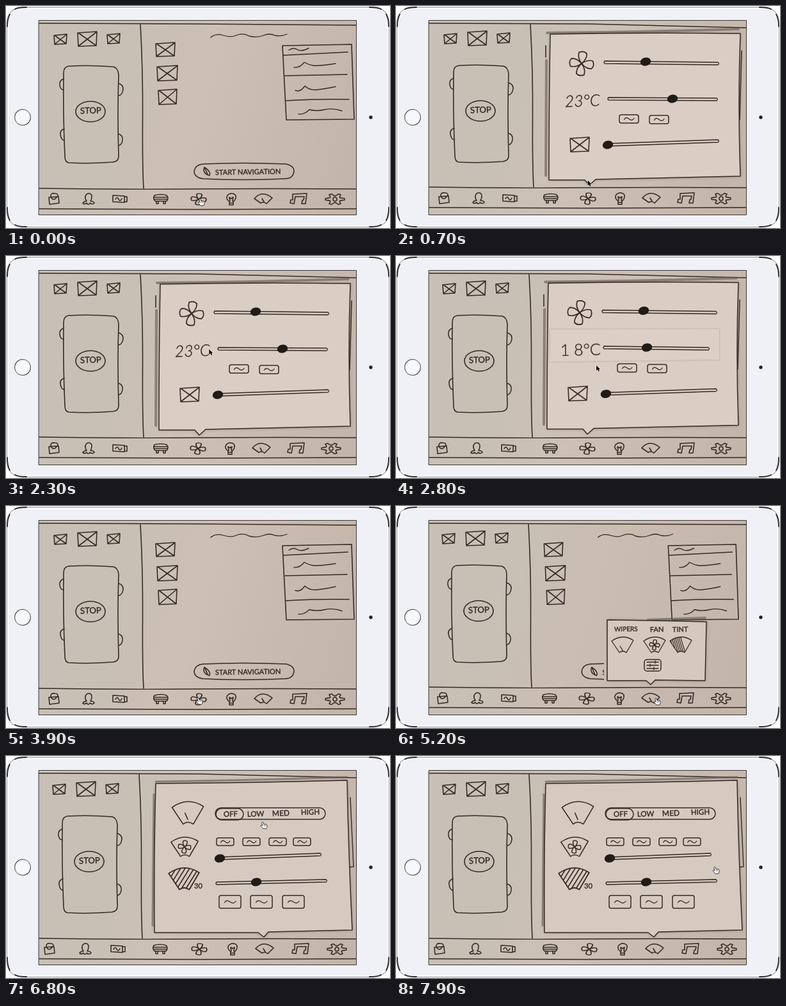
These frames come from a looping animation (600x347 px, 8000 ms). An HTML page with a canvas:

```html
<!DOCTYPE html>
<html lang="en">
<head>
<meta charset="utf-8">
<title>Paper prototype on a tablet</title>
<style>
html, body { margin: 0; width: 100%; height: 100%; overflow: hidden; background: #fff; }
canvas { display: block; width: 600px; height: 347px; }
</style>
</head>
<body>
<canvas id="stage" width="600" height="347"></canvas>
<script>
const ctx = document.getElementById('stage').getContext('2d');
const INK = '#352b25';
const LOOP = 8000;
const STEP = 100;

function ink(d, width = 1.6, fill) {
  const path = new Path2D(d);
  if (fill) { ctx.fillStyle = fill; ctx.fill(path); }
  ctx.lineWidth = width;
  ctx.strokeStyle = INK;
  ctx.stroke(path);
}

function at(x, y, draw, scale = 1) {
  ctx.save();
  ctx.translate(x, y);
  ctx.scale(scale, scale);
  draw();
  ctx.restore();
}

function write(text, x, y, size, tilt = 0, style = '400') {
  at(x, y, () => {
    ctx.rotate(tilt);
    ctx.fillStyle = ctx.strokeStyle = INK;
    ctx.lineWidth = 0.4;
    ctx.font = `${style} ${size}px Lato, sans-serif`;
    ctx.fillText(text, 0, 0);
    ctx.strokeText(text, 0, 0);
  });
}

function crossBox(x, y, w, h) {
  at(x, y, () => {
    ink(`M0 2L${w} 0L${w - 1} ${h - 1}L1 ${h}ZM1 2L${w - 1} ${h - 1}M${w - 1} 1L2 ${h - 1}`, 1.6);
  });
}

function softBox(x, y, w, h, r) {
  ctx.beginPath();
  ctx.roundRect(x, y, w, h, r);
  ctx.lineWidth = 1.5;
  ctx.strokeStyle = INK;
  ctx.stroke();
}

function waveButton(x, y, w, h) {
  softBox(x, y, w, h, 3);
  const q = w / 6;
  at(x + w / 2, y + h / 2, () => ink(`M${-q * 1.5} 1Q${-q} -4 0 0T${q * 1.6} -1`, 1.3));
}

function slider(x1, y1, x2, y2, knobX, knobY) {
  ink(`M${x1} ${y1 - 2}L${x2} ${y2 - 2}Q${x2 + 3} ${y2} ${x2} ${y2 + 2}L${x1} ${y1 + 2}Q${x1 - 2} ${y1} ${x1} ${y1 - 2}`, 1.3);
  ctx.fillStyle = '#211b18';
  ctx.beginPath();
  ctx.ellipse(knobX, knobY, 8.3, 6.5, -0.2, 0, 7);
  ctx.fill();
}

function fan(r, width) {
  const p = k => (k * r).toFixed(1);
  for (let i = 0; i < 4; i++) {
    ctx.save();
    ctx.rotate(i * Math.PI / 2 + 0.1);
    ink(`M0 0Q${p(-.4)} ${p(-.45)} ${p(-.3)} ${p(-.9)}Q${p(.1)} ${p(-1.1)} ${p(.35)} ${p(-.85)}Q${p(.4)} ${p(-.4)} 0 0`, width);
    ctx.restore();
  }
}

// Windscreen outline, about 34 px wide
const GLASS = 'M-17 -6Q0 -18 17 -7L6 12Q0 8 -5 12Z';

function hatchedGlass(dense) {
  ctx.save();
  ctx.clip(new Path2D(GLASS));
  const gap = dense ? 2.8 : 5;
  for (let x = -24; x < (dense ? -1 : 5); x += gap) {
    ink(dense ? `M${x} -16L${x + 9} 14` : `M${x} 13L${x + 18} -16`, 1.2);
  }
  ctx.restore();
  ink(GLASS, 1.3);
}

const icons = [
  () => ink('M-8 -3L7 -4L8 6L-7 8ZM-5 -3Q-6 -10 1 -9Q7 -9 6 -4M-4 -2Q0 3 4 -3'),
  () => ink('M-3 3Q-6 -1 -5 -5Q-3 -9 0 -9Q5 -9 5 -4Q5 0 3 3Q8 3 9 6Q6 9 2 6Q0 10 -3 6Q-7 9 -9 6Q-7 3 -3 3'),
  () => ink('M-11 -6L7 -5L7 5L-11 4ZM7 -4L11 -4L11 4L7 4M-7 0Q-4 -5 -2 0T3 -1'),
  () => ink('M-10 -6Q0 -9 9 -6Q13 -2 9 3L-9 3Q-13 -1 -10 -6ZM-11 -3L10 -3M-11 0L10 0M-7 3L-7 7L-4 7L-4 3M4 3L4 7L7 7L7 3'),
  () => { ctx.scale(1.2, 0.9); fan(10, 1.5); },
  () => ink('M-3 4Q-8 0 -7 -4Q-5 -9 1 -9Q8 -8 7 -3Q7 1 3 4L3 9L-3 9ZM-3 6L3 6M-2 3L-3 -3L0 -1L3 -3L2 3'),
  () => ink('M-14 -1Q-2 -15 14 -2L5 7Q1 3 -4 6ZM1 4L-2 -1'),
  () => ink('M-9 -8L13 -9L11 7L5 7L6 2L8 1L9 -4L-5 -4L-7 7L-13 6L-12 1L-9 1Z'),
  () => {
    let d = '';
    for (let i = 0; i < 24; i++) {
      const a = (i - 0.5) * Math.PI / 12, r = i % 4 < 2 ? 1 : 0.6;
      d += `${i ? 'L' : 'M'}${(15 * r * Math.cos(a)).toFixed(1)} ${(9 * r * Math.sin(a)).toFixed(1)}`;
    }
    ink(d + 'ZM-3 0A3 3 0 1 0 3 0A3 3 0 1 0 -3 0');
  }
];

function paper(middle) {
  const g = ctx.createLinearGradient(51, 60, 548, 200);
  g.addColorStop(0, '#c8c0b6');
  g.addColorStop(0.3, '#c8bfb5');
  g.addColorStop(0.5, middle);
  g.addColorStop(1, '#c4b5aa');
  ctx.fillStyle = g;
  ctx.fillRect(51, 22, 497, 305);
}

function sheet(d, fill) {
  ctx.save();
  ctx.shadowColor = '#54483e80';
  ctx.shadowBlur = 5;
  ctx.fillStyle = fill;
  ctx.fill(new Path2D(d));
  ctx.restore();
  ink(d, 1.5);
}

function smear(d, width = 4) {
  ctx.strokeStyle = '#61574f99';
  ctx.lineWidth = width;
  ctx.stroke(new Path2D(d));
}

function carSide(dx, dy) {
  at(dx, dy, () => {
    crossBox(75, 44, 20, 16);
    crossBox(112, 40, 30, 23);
    crossBox(158, 43, 20, 16);
    ink('M98 94Q132 92 168 95Q175 97 176 107Q174 165 176 235Q176 243 167 244Q130 247 98 245Q92 244 92 235Q89 170 90 105Q90 95 98 94Z', 1.6);
    ink('M90 114Q83 116 84 124Q85 131 90 131M91 192Q84 194 85 201Q86 209 91 210M176 121Q183 123 183 130Q182 139 176 140M176 200Q183 202 182 210Q181 217 176 218');
    ctx.beginPath();
    ctx.ellipse(132, 165, 23, 16, 0, 0, 7);
    ctx.lineWidth = 1.6;
    ctx.stroke();
    write('STOP', 116, 168.5, 13.2, -0.03);
  });
}

function frameLines(dx, topRight, floor) {
  ink(`M52 27L300 28L547 ${topRight}M52 ${floor}Q180 ${floor + 2} 300 ${floor + 1}T547 ${floor + 1}M52 ${floor + 32}L300 ${floor + 33}L547 ${floor + 32}`, 1.4);
  ink(`M${210 + dx} 29Q${214 + dx} 100 ${213.5 + dx} 175T${215 + dx} ${floor}`, 1.6);
}

function base({ dx, dy, top, floor, iconY, iconXs, middle }) {
  paper(middle);
  frameLines(dx, top, floor);
  carSide(dx, dy);
  iconXs.forEach((x, i) => at(x, iconY, icons[i]));
}

function mapSide(dx = 0, stretch = 1) {
  ctx.save();
  ctx.translate(dx, 0);
  ctx.scale(stretch, 1);
  crossBox(234, 57, 30, 22);
  crossBox(236, 93, 32, 24);
  crossBox(238, 130, 29, 24);
  ink('M320 49Q328 42 340 46Q352 50 362 45Q372 42 380 47Q392 50 402 46Q412 42 420 46Q430 48 439 44', 1.3);
  ink('M432 62L540 60L544 177L438 178ZM434 77Q490 74 534 72M436 109L533 107M437 148Q490 145 536 146', 1.6);
  ink('M442 69Q449 64 455 68T473 66M450 96Q459 97 466 88Q473 92 480 93T515 90M452 132Q460 135 467 125Q473 131 482 131T515 126M457 169Q466 170 474 162Q485 165 498 162T525 164', 1.4);
  ink('M308 247Q370 244 438 247Q450 250 450 258Q449 270 435 270Q370 273 308 270Q294 268 294 258Q296 248 308 247Z', 1.6);
  ink('M310 252Q306 261 318 265Q321 259 310 252M310 252L315 263', 1.6);
  write('START NAVIGATION', 327, 264, 11, -0.015);
  ctx.restore();
}

const mainLook = {
  dx: 0, dy: 0, top: 30, floor: 285, iconY: 302, middle: '#cdbfb5',
  iconXs: [75, 129, 178, 242, 301, 352, 402, 457, 514]
};
const climateLook = {
  dx: 0, dy: -1, top: 34, floor: 283, iconY: 301, middle: '#cdc1b7',
  iconXs: [75, 129, 178, 242, 300, 350, 399, 453, 508]
};
const coolLook = { ...climateLook, dx: -2, iconXs: [72, 126, 176, 241, 299, 349, 398, 453, 508] };
const wiperLook = {
  ...climateLook, dx: -3, top: 29, middle: '#cabdb2',
  iconXs: [73, 127, 176, 240, 298, 349, 398, 452, 508]
};
const detailLook = {
  ...climateLook, dx: -2, dy: 0, floor: 285, iconY: 302,
  iconXs: [68, 124, 175, 241, 302, 354, 404, 460, 517]
};

function mainScreen() {
  base(mainLook);
  mapSide();
}

function climatePanel(cool) {
  base(cool ? coolLook : climateLook);
  const shift = cool ? -3 : 0;
  at(shift, shift / 2, () => {
    smear('M236 42Q380 41 535 36M235 85L234 265');
    ink('M234 62L234 80M540 70L537 178', 1.6);
    sheet('M241 44Q390 41 538 43Q534 150 538 266Q425 269 312 271L302 280L295 272L239 272Q239 150 241 44Z', '#dacdc4');
    at(290, 90, () => fan(19, 1.7));
    slider(326, 88, 503, 90, 390, 87);
    if (!cool) {
      write('23°C', 264, 158, 25, -0.04, 'italic 300');
      slider(332, 145, 501, 146, 432, 145);
    }
    waveButton(349, 170, 30, 13);
    waveButton(396, 171, 30, 13);
    crossBox(272, 205, 30, 23);
    slider(331, 217, 503, 211, 331, 217);
  });
  if (!cool) return;
  // Taped-on strip with the lower temperature
  ctx.save();
  ctx.shadowColor = '#66584c66';
  ctx.shadowBlur = 3;
  ctx.fillStyle = '#dbcfc6';
  ctx.fill(new Path2D('M241 115L505 114L505 162L240 165Z'));
  ctx.restore();
  write('1 8°C', 257, 156, 25, -0.02, '300');
  slider(325, 143, 488, 145, 392, 143);
}

function wiperPopup() {
  base(wiperLook);
  mapSide(2, 0.98);
  ctx.fillStyle = '#cdc0b5';
  ctx.fillRect(325, 178, 6, 97);
  smear('M394 178L483 175');
  sheet('M330 178Q410 179 485 181L483 273L405 272L398 279L391 273L330 273Z', '#d5c8bd');
  write('WIPERS', 341, 196, 10, -0.01);
  write('FAN', 397, 197, 11, -0.02);
  write('TINT', 432, 197, 11, -0.02);
  at(354, 217, () => ink(GLASS + 'M1 10L-4 2', 1.3));
  at(404, 217, () => { ink(GLASS, 1.3); fan(8, 1.4); });
  at(445, 217, () => hatchedGlass(true));
  softBox(388, 240, 26, 18, 4);
  ink('M392 244L410 244M392 249L410 249M392 254L410 254M405 242L405 246M397 247L397 251M403 252L403 256', 1.3);
}

function wiperPanel() {
  base(detailLook);
  smear('M234 40Q380 38 533 33M231 60L229 265', 3);
  ink('M538 65L543 173L536 174', 1.4);
  sheet('M234 43Q390 42 533 38Q535 150 541 272L410 275L403 283L394 276L232 276Q231 150 234 43Z', '#d6cac0');
  at(284, 89, () => ink(GLASS + 'M0 7L-3 0', 1.1), 1.45);
  at(279, 142, () => { ink(GLASS, 1.2); fan(8, 1.2); }, 1.25);
  at(278, 192, () => hatchedGlass(false), 1.4);
  softBox(327, 81, 172, 18, 9);
  softBox(328, 82, 43, 18, 9);
  write('OFF', 340, 95, 11.5, -0.03);
  write('LOW', 377, 95, 11.5, -0.03);
  write('MED', 416, 94, 12, -0.03);
  write('HIGH', 461, 92, 11.5, -0.03);
  [329, 370, 411, 449].forEach(x => waveButton(x, 128, 27, 12));
  slider(334, 160, 491, 154, 334, 160);
  write('30', 294, 207, 11);
  slider(329, 199, 500, 195, 391, 197);
  [333, 382, 432].forEach(x => waveButton(x, 218, 34, 20));
}

function tablet() {
  ctx.fillStyle = '#fff';
  ctx.fillRect(0, 0, 600, 347);
  ctx.beginPath();
  ctx.roundRect(1.5, 2, 597, 343.5, 23);
  ctx.strokeStyle = '#a9aaaf';
  ctx.lineWidth = 1.3;
  ctx.stroke();
  ctx.beginPath();
  ctx.roundRect(4, 4.5, 592, 338.5, 21);
  ctx.fillStyle = '#eff1f6';
  ctx.fill();
  // Dark reflections on the metal corners
  ctx.strokeStyle = '#2a2a2c';
  ctx.lineWidth = 1.8;
  ctx.stroke(new Path2D('M2 32Q2 20 6 13M14 5Q19 2 32 2M568 2Q581 2 586 5M594 13Q598 20 598 32M2 315Q2 328 6 335M14 342Q19 345 32 345M568 345Q581 345 586 342M594 335Q598 328 598 315'));
  ctx.beginPath();
  ctx.arc(26, 174, 12.3, 0, 7);
  ctx.fillStyle = '#f7f8fb';
  ctx.fill();
  const ring = ctx.createLinearGradient(14, 162, 38, 186);
  ring.addColorStop(0, '#333');
  ring.addColorStop(0.5, '#99999d');
  ring.addColorStop(1, '#333');
  ctx.lineWidth = 1.3;
  ctx.strokeStyle = ring;
  ctx.stroke();
  ctx.fillStyle = '#222';
  ctx.beginPath();
  ctx.arc(570, 174, 2.7, 0, 7);
  ctx.fill();
}

const scenes = [
  [0, mainScreen],
  [100, () => climatePanel(false)],
  [2500, () => climatePanel(true)],
  [3900, mainScreen],
  [5200, wiperPopup],
  [6400, wiperPanel]
];

// Pointer stops: time, x, y
const route = [
  [0, 302, 301], [300, 302, 301], [1000, 298, 254], [1500, 298, 254],
  [2400, 318, 142], [2800, 313, 171], [3300, 299, 299], [3900, 299, 299],
  [4700, 405, 300], [5500, 405, 300], [6300, 398, 247], [6400, 398, 247],
  [6900, 400, 86], [7300, 398, 122], [7600, 396, 188], [7900, 497, 173], [LOOP, 497, 173]
];
const handTimes = [[0, 400], [3400, 4000], [4600, 5700], [6400, LOOP]];

function pointer(t) {
  const i = route.findIndex(stop => stop[0] > t);
  const [t0, x0, y0] = route[i - 1], [t1, x1, y1] = route[i];
  const k = (t - t0) / (t1 - t0);
  const e = k * k * (3 - 2 * k);
  const hand = handTimes.some(([from, to]) => t >= from && t < to);
  at(x0 + (x1 - x0) * e, y0 + (y1 - y0) * e, () => {
    if (hand) {
      ink('M0 1Q1 -1 2 1L3 4L7 4Q9 5 8 8L7 11L2 11L-2 6Q-1 4 1 6Z', 0.9, '#fff');
      ink('M4 5L4 7M6 5L6 7', 0.6);
    } else {
      const arrow = new Path2D('M0 0L0 8L2 6.5L3.5 9.5L5 8.8L3.6 6L6 6Z');
      ctx.strokeStyle = '#fff';
      ctx.lineWidth = 1;
      ctx.stroke(arrow);
      ctx.fillStyle = '#000';
      ctx.fill(arrow);
    }
  });
}

function draw(now) {
  const t = Math.floor((now % LOOP) / STEP) * STEP;
  ctx.lineCap = ctx.lineJoin = 'round';
  tablet();
  ctx.save();
  ctx.beginPath();
  ctx.rect(51, 22, 497, 305);
  ctx.clip();
  scenes.filter(([start]) => start <= t).pop()[1]();
  pointer(t);
  ctx.restore();
  ctx.strokeStyle = '#3b3734';
  ctx.lineWidth = 1;
  ctx.strokeRect(51.5, 22.5, 496, 304);
}

const start = performance.now();
function tick() {
  draw(performance.now() - start);
  requestAnimationFrame(tick);
}
tick();
</script>
</body>
</html>
```
